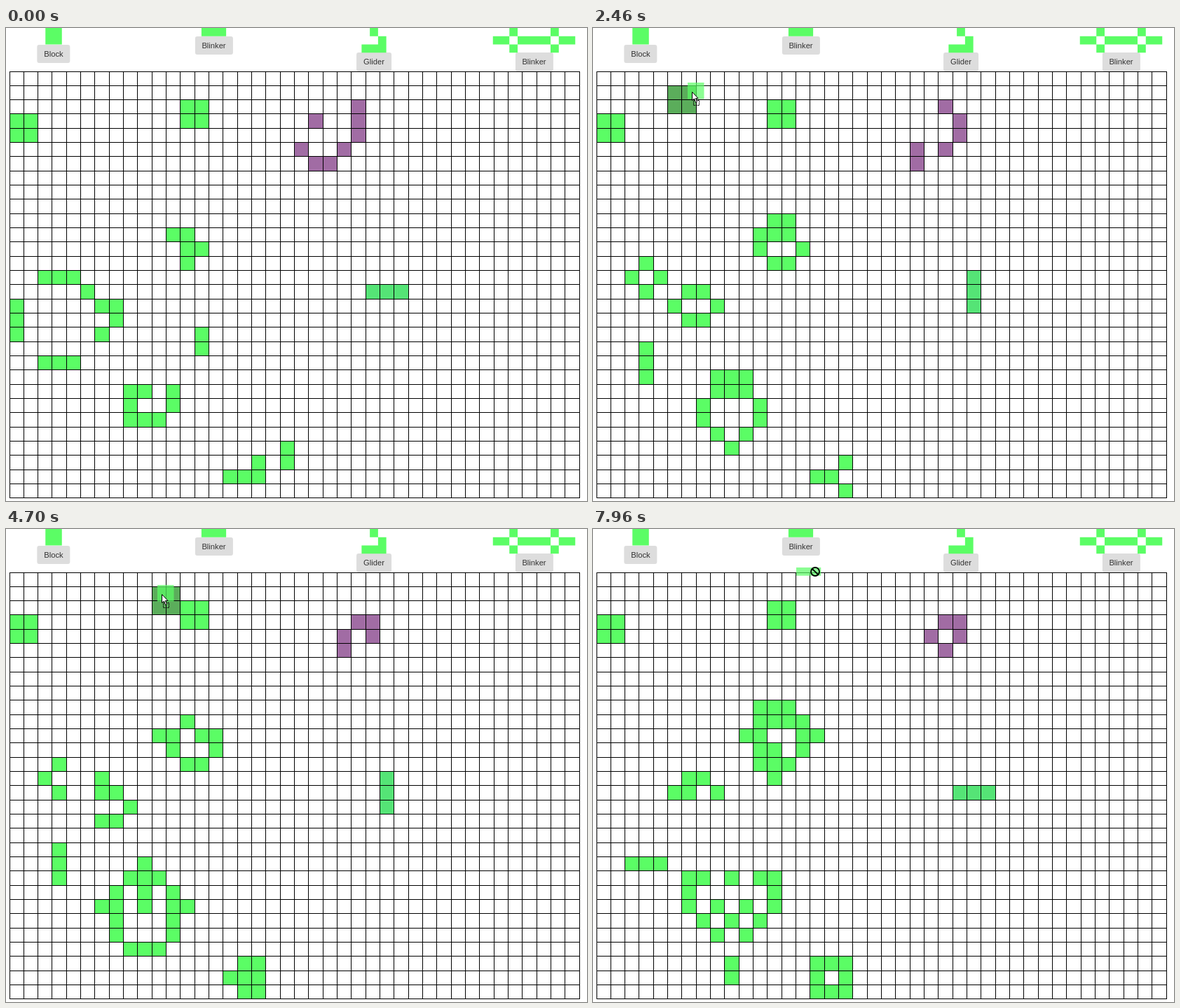
Write an HTML page with a canvas that moves like this. It is 829 px wide and 676 px high and loops after 8000 ms.

```html
<!DOCTYPE html>
<html lang="en">
<head>
<meta charset="utf-8">
<title>Game of Life</title>
<style>
  html, body { margin: 0; width: 100%; height: 100%; overflow: hidden; background: #fff; }
  canvas { position: absolute; left: 0; top: 0; }
  .label {
    position: absolute; transform: translateX(-50%);
    padding: 0 10px; border-radius: 3px; background: #ddd; color: #333;
    font: 11.2px/26.5px Arial, "Liberation Sans", sans-serif; white-space: nowrap;
  }
</style>
</head>
<body>
<canvas id="stage" width="829" height="676"></canvas>
<script>
const ctx = document.getElementById('stage').getContext('2d');
const LOOP = 8000, TICK = 77.5;
const COLS = 40, ROWS = 30, LEFT = 5, TOP = 62, CELL = 20.325, UNIT = 11.75;
const GREEN = '#5bfd65', TEAL = '#55e476', PURPLE = '#a16ca4', DARK = '#168a16';
const gx = c => Math.floor(LEFT + CELL * c);
const gy = r => Math.floor(TOP + CELL * r);

const BLOCK = 'oo/oo', BLINKER = 'ooo';
const PALETTE = [
  ['Block', BLOCK], ['Blinker', BLINKER], ['Glider', '.o/..o/ooo'],
  ['Blinker', '..o....o/oo.oooo.oo/..o....o']
];
// Patterns on the board at the start: column, row, shape
const COLONY = [
  [0, 3, BLOCK], [12, 2, BLOCK],
  [2, 14, BLINKER], [2, 20, BLINKER], [25, 15, BLINKER], [0, 16, 'o/o/o'],
  [11, 11, 'oo/.oo/.o'], [5, 15, 'o/.oo/..o/.o'], [13, 18, 'o/o'],
  [8, 22, 'oo.o/o..o/ooo'], [15, 26, '....o/..o.o/ooo'],
  [20, 2, '....o/.o..o/....o/o..o/.oo']
];
// Pointer path: tick, x, y
const PATH = [
  [0, 745, 32], [9, 64, 13], [16, 62, 13], [22, 119, 57], [27, 120, 83],
  [38, 196, 111], [51, 222, 93], [66, 222, 93], [77, 231, 92], [81, 231, 92],
  [92, 305, 5], [96, 305, 5], [101, 316, 60]
];
const DRAGS = [
  { from: 17, to: 77, shape: BLOCK, dx: 6, dy: 13 },
  { from: 97, to: Infinity, shape: BLINKER, dx: 26, dy: 5 }
];
// Drop preview: tick, column, row
const HINTS = [[28, 5, 1], [44, 7, 2], [55, 10, 1]];

function eachCell(shape, fn) {
  shape.split('/').forEach((row, r) =>
    [...row].forEach((ch, c) => { if (ch === 'o') fn(c, r); }));
}

function nextGen(cells) {
  const at = (c, r) => (cells[r] && cells[r][c]) || 0;
  return cells.map((row, r) => row.map((alive, c) => {
    let n = -alive;
    for (let y = -1; y <= 1; y++)
      for (let x = -1; x <= 1; x++) n += at(c + x, r + y);
    return n === 3 || (alive && n === 2) ? 1 : 0;
  }));
}

const gens = [Array.from({ length: ROWS }, () => Array(COLS).fill(0))];
COLONY.forEach(([c0, r0, shape]) =>
  eachCell(shape, (c, r) => { gens[0][r0 + r][c0 + c] = 1; }));
while (gens.length < 9) gens.push(nextGen(gens[gens.length - 1]));

// One generation about every second; dragging stalls the clock for a while
function genAt(tick) {
  const t = tick > 39 && tick < 54 ? 39 : tick;
  return Math.max(0, Math.floor((t - 1.1) / 12.8) + 1);
}

function pointerAt(tick) {
  const i = Math.max(1, PATH.findIndex(k => k[0] >= tick));
  const [t0, x0, y0] = PATH[i - 1], [t1, x1, y1] = PATH[i];
  const f = (tick - t0) / (t1 - t0);
  return [Math.round(x0 + (x1 - x0) * f), Math.round(y0 + (y1 - y0) * f)];
}

function box(c, r, size) {
  ctx.fillRect(gx(c), gy(r), gx(c + size) - gx(c), gy(r + size) - gy(r));
}

function drawShape(x, y, shape) {
  ctx.fillStyle = GREEN;
  ctx.beginPath();
  eachCell(shape, (c, r) => ctx.rect(x + c * UNIT, y + r * UNIT, UNIT, UNIT));
  ctx.fill();
}

const paletteX = i => 68 + 228.5 * i;
const shapeSize = shape => {
  const rows = shape.split('/');
  return [Math.max(...rows.map(r => r.length)) * UNIT, rows.length * UNIT];
};

function addLabels() {
  PALETTE.forEach(([name, shape], i) => {
    const label = document.createElement('div');
    label.className = 'label';
    label.textContent = name;
    label.style.left = paletteX(i) + 'px';
    label.style.top = shapeSize(shape)[1] + 'px';
    document.body.prepend(label);
  });
}

function drawPalette() {
  PALETTE.forEach(([, shape], i) => drawShape(paletteX(i) - shapeSize(shape)[0] / 2, 0, shape));
}

function drawCells(cells) {
  cells.forEach((row, r) => row.forEach((alive, c) => {
    if (!alive) return;
    ctx.fillStyle = c < 20 ? GREEN : r < 10 ? PURPLE : TEAL;
    box(c, r, 1);
  }));
}

function drawHint(tick) {
  const hint = HINTS.filter(h => h[0] <= tick).pop();
  if (!hint || tick >= DRAGS[0].to) return;
  ctx.globalAlpha = Math.min(1, Math.max(.7, (tick - 54) / 12));
  ctx.fillStyle = DARK;
  box(hint[1], hint[2], 2);
  ctx.globalAlpha = 1;
}

function drawLines() {
  ctx.fillStyle = '#000';
  for (let c = 0; c <= COLS; c++) ctx.fillRect(gx(c), TOP, 1, gy(ROWS) - TOP + 1);
  for (let r = 0; r <= ROWS; r++) ctx.fillRect(LEFT, gy(r), gx(COLS) - LEFT + 1, 1);
}

function drawArrow(x, y, dropping) {
  ctx.save();
  ctx.translate(x + .5, y + .5);
  ctx.lineWidth = 1;
  ctx.strokeStyle = '#000';
  ctx.fillStyle = '#fff';
  if (dropping) {
    ctx.setLineDash([2, 1]);
    ctx.strokeRect(2, 12, 8, 7);
    ctx.setLineDash([]);
  }
  const arrow = new Path2D('M0 0V12L3 9.5 5 15 7 14 5 9H8.5Z');
  ctx.fill(arrow);
  ctx.stroke(arrow);
  ctx.restore();
}

function drawNoDrop(x, y) {
  ctx.strokeStyle = '#000';
  ctx.lineWidth = 1.8;
  ctx.beginPath();
  ctx.arc(x, y, 6, 0, 2 * Math.PI);
  ctx.moveTo(x - 4.2, y - 4.2);
  ctx.lineTo(x + 4.2, y + 4.2);
  ctx.stroke();
}

function drawPointer(tick) {
  const [x, y] = pointerAt(tick);
  const drag = DRAGS.find(d => tick >= d.from && tick < d.to);
  if (drag) {
    ctx.globalAlpha = .7;
    drawShape(x - drag.dx, y - drag.dy, drag.shape);
    ctx.globalAlpha = 1;
  }
  if (drag && y < TOP) drawNoDrop(x + 1, y + 1);
  else drawArrow(x, y, !!drag);
}

function draw(ms) {
  const tick = Math.floor((ms - 110) / TICK);
  ctx.clearRect(0, 0, 829, 676);
  drawPalette();
  drawCells(gens[genAt(tick)]);
  drawHint(tick);
  drawLines();
  if (tick >= 0) drawPointer(tick);
}

addLabels();
const begin = performance.now();
function loop() {
  draw((performance.now() - begin) % LOOP);
  requestAnimationFrame(loop);
}
loop();
</script>
</body>
</html>
```
